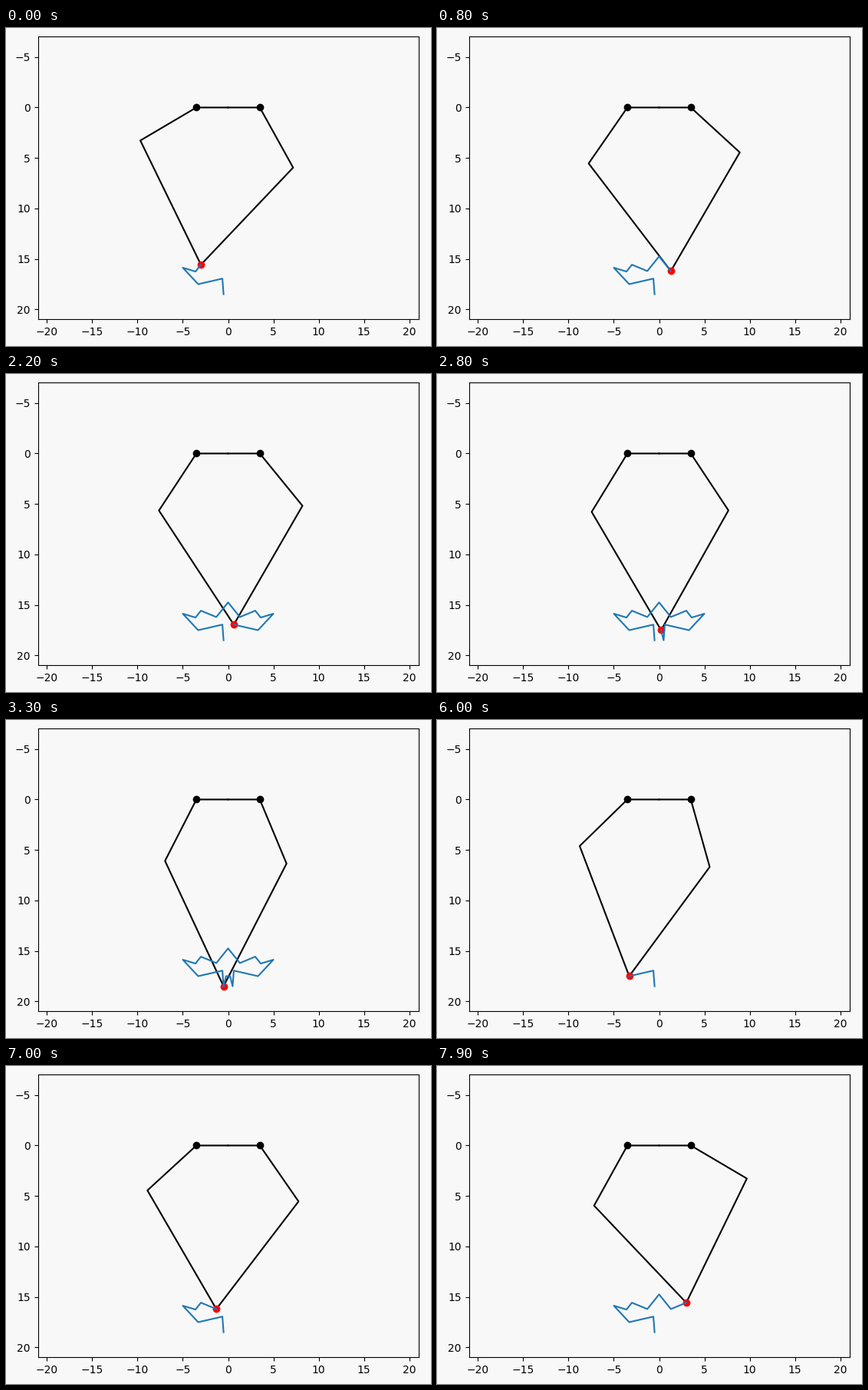
Recreate the animation shown at these times as a matplotlib script. Size 554 by 414 pixels, loop 8000 ms.

```python
import numpy as np
import matplotlib.pyplot as plt
from matplotlib.animation import FuncAnimation

W, H, DPI = 554, 414, 100
STEP_MS, FRAMES = 100, 80

BASE_X = 3.5            # half the distance between the two motors
UPPER, LOWER = 7, 14    # link lengths

# Left half of the outline, from the bottom tip up to the centre peak
half = [(-0.5, 18.5), (-0.63, 16.95), (-3.3, 17.5), (-5, 15.87),
        (-3.6, 16.25), (-3, 15.57), (-1.3, 16.2)]
mirrored = [(-x, y) for x, y in reversed(half)]
path = np.array(half + [(0, 14.75)] + mirrored
                + [(0.22, 17.5), (-0.22, 17.5), half[0]])

# Frames at which the tip jumps to its next point, in two passes
FIRST_PASS = [0, 2, 5, 8, 11, 14, 17, 19, 22, 25, 28, 30, 33]
SECOND_PASS = [60, 61, 64, 67, 70, 73, 75, 79]
starts = np.array(FIRST_PASS + SECOND_PASS)
points = [*range(5, 18), *range(2, 10)]


def arm(side, tip):
    """Points of one arm; side is -1 for left and 1 for right."""
    base = np.array([side * BASE_X, 0.0])
    dx, dy = tip - base
    dist = np.hypot(dx, dy)
    bend = np.arccos((dist**2 + UPPER**2 - LOWER**2) / (2 * UPPER * dist))
    angle = np.arctan2(dy, dx) - side * bend
    elbow = base + UPPER * np.array([np.cos(angle), np.sin(angle)])
    return np.array([(0, 0), base, elbow, tip])


# The small margin keeps the pixel size from being rounded down
fig = plt.figure(figsize=((W + 0.01) / DPI, (H + 0.01) / DPI), dpi=DPI,
                 facecolor="#f8f8f8")
ax = fig.add_axes([41.5 / W, 34.5 / H, 496 / W, 368 / H], facecolor="#f8f8f8")
ax.set_xlim(-21, 21)
ax.set_ylim(21, -7)

arms = {side: ax.plot([], [], "k")[0] for side in (-1, 1)}
ax.plot([-BASE_X, BASE_X], [0, 0], "ko")
tip_dot, = ax.plot([], [], "ro")
trace, = ax.plot([], [], color="tab:blue")


def draw(frame):
    current = points[np.searchsorted(starts, frame, side="right") - 1]
    tip = path[current]
    for side, line in arms.items():
        line.set_data(*arm(side, tip).T)
    tip_dot.set_data([tip[0]], [tip[1]])
    trace.set_data(*path[:current + 1].T)
    return [*arms.values(), tip_dot, trace]


anim = FuncAnimation(fig, draw, frames=FRAMES, interval=STEP_MS,
                     init_func=lambda: draw(0), repeat=True, repeat_delay=0)
plt.show()
```
